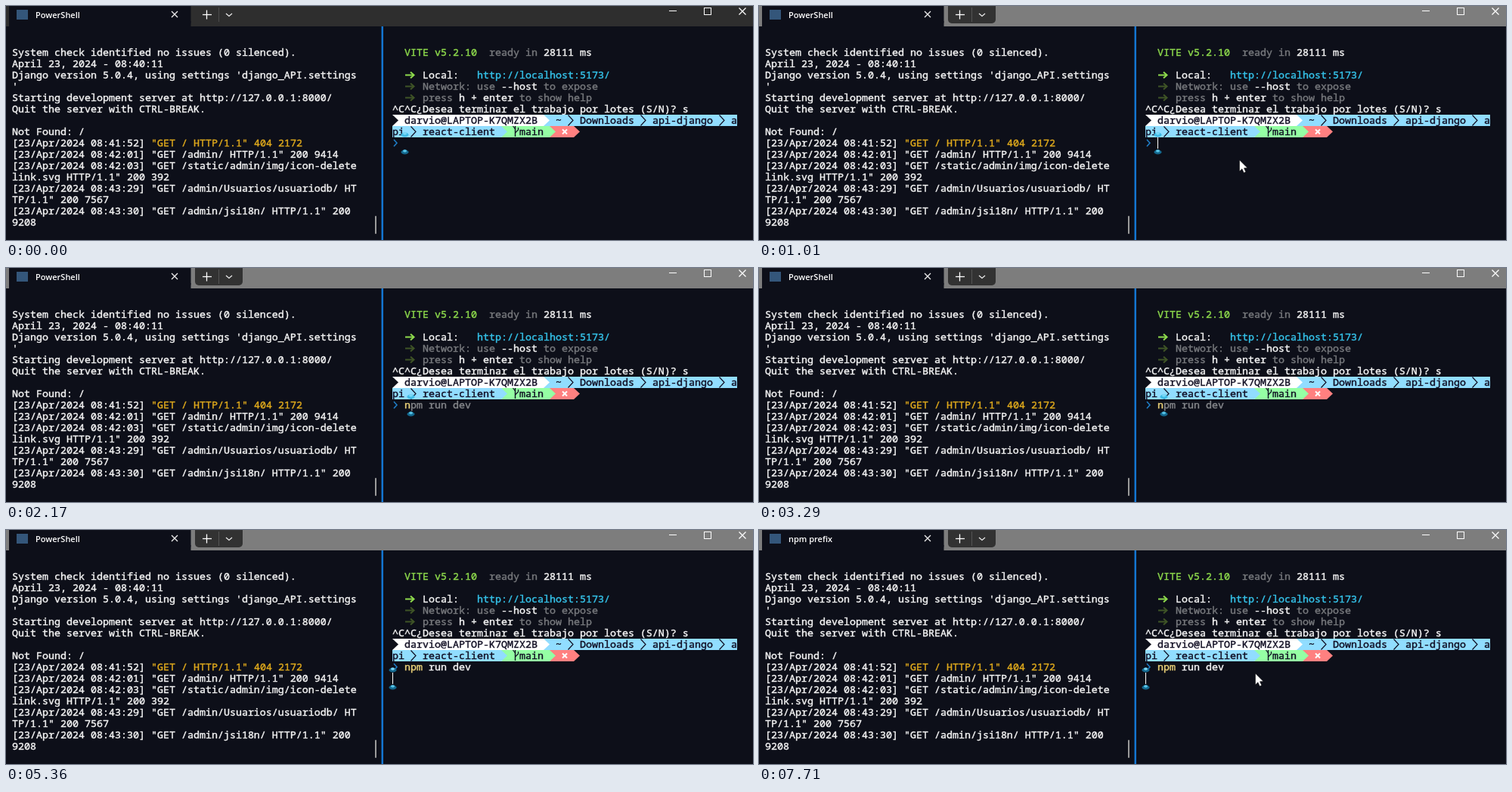
Recreate the animation shown at these times as an HTML page with a canvas. Size 988 by 310 pixels, loop 8 s.

```html
<!DOCTYPE html>
<html lang="es">
<head>
<meta charset="utf-8">
<title>Terminal</title>
<style>
html, body { margin: 0; width: 100%; height: 100%; overflow: hidden; background: #0d0f19; }
canvas { display: block; }
</style>
</head>
<body>
<canvas id="stage" width="988" height="310"></canvas>
<script>
const ctx = document.getElementById('stage').getContext('2d');
const LOOP = 8000, CELL = 8, ROW = 15, TOP = 54, LEFT = 8, RIGHT = 511;
const MONO = '13.333px "Noto Sans Mono", "DejaVu Sans Mono", monospace';
const BG = '#0d0f19', WHITE = '#f6f6f6', DIM = '#77797d', INK = '#100e23';
const BLUE = '#91ddff', GREEN = '#95ffa4', RED = '#ff8080', LIME = '#8edb4c', CYAN = '#35c3ea';
const AMBER = '#e0aa1c', YELLOW = '#eed47a', MOSS = '#3f5426';

const log = [
  'System check identified no issues (0 silenced).',
  'April 23, 2024 - 08:40:11',
  "Django version 5.0.4, using settings 'django_API.settings",
  "'",
  'Starting development server at http://127.0.0.1:8000/',
  'Quit the server with CTRL-BREAK.',
  '',
  'Not Found: /',
  '[23/Apr/2024 08:41:52]',
  '[23/Apr/2024 08:42:01] "GET /admin/ HTTP/1.1" 200 9414',
  '[23/Apr/2024 08:42:03] "GET /static/admin/img/icon-delete',
  'link.svg HTTP/1.1" 200 392',
  '[23/Apr/2024 08:43:29] "GET /admin/Usuarios/usuariodb/ HT',
  'TP/1.1" 200 7567',
  '[23/Apr/2024 08:43:30] "GET /admin/jsi18n/ HTTP/1.1" 200',
  '9208'
];

// Times at which the text bar turns on or off, starting from off.
const blinks = [740, 1490, 1640, 2170, 2760, 3290, 3860, 4370, 4770, 5910, 6480, 7110, 7640];

// Pointer stops: time, x, y; a missing place hides it.
const stops = [
  [0], [70, 632, 246], [230, 636, 204], [1640],
  [6240, 636, 204], [6330, 651, 203], [6420, 647, 203], [6510, 642, 202],
  [6710, 648, 197], [6780, 653, 193], [6840, 657, 190]
];

// A hairline outline gives the regular face its medium weight.
function text(str, x, row, color) {
  const y = TOP + row * ROW + 12;
  ctx.font = MONO;
  ctx.fillStyle = ctx.strokeStyle = color;
  ctx.lineWidth = .4;
  ctx.fillText(str, x, y);
  ctx.strokeText(str, x, y);
}

const right = (str, col, row, color = WHITE) => text(str, RIGHT + col * CELL, row, color);

function rect(x, y, w, h, color) {
  ctx.fillStyle = color;
  ctx.fillRect(x, y, w, h);
}

function round(x, y, w, h, r, color) {
  ctx.fillStyle = color;
  ctx.beginPath();
  ctx.roundRect(x, y, w, h, r);
  ctx.fill();
}

function oval(x, y, rx, ry, color) {
  ctx.fillStyle = color;
  ctx.beginPath();
  ctx.ellipse(x, y, rx, ry, 0, 0, 7);
  ctx.fill();
}

function path(points, close) {
  ctx.beginPath();
  for (let i = 0; i < points.length; i += 2) ctx.lineTo(points[i], points[i + 1]);
  if (close) ctx.closePath();
}

function line(points, color, width = 1) {
  path(points);
  ctx.strokeStyle = color;
  ctx.lineWidth = width;
  ctx.stroke();
}

function shape(points, color) {
  path(points, true);
  ctx.fillStyle = color;
  ctx.fill();
}

function cross(x, y, r, color, width = 1) {
  line([x - r, y - r, x + r, y + r], color, width);
  line([x - r, y + r, x + r, y - r], color, width);
}

function segment(from, to, row, color) {
  rect(RIGHT + from * CELL, TOP + row * ROW, (to - from) * CELL, ROW, color);
}

function tip(col, row, color) {
  const x = RIGHT + col * CELL, y = TOP + row * ROW;
  shape([x, y, x + CELL, y + ROW / 2, x, y + ROW], color);
}

function chevron(col, row) {
  const x = RIGHT + col * CELL, y = TOP + row * ROW;
  line([x + .5, y + .5, x + 7, y + 7.5, x + .5, y + 14.5], INK, 1.2);
}

function arrow(row, color) {
  const x = RIGHT + 2 * CELL, y = TOP + row * ROW + 7.5;
  line([x + 1, y, x + 12, y], color, 2);
  line([x + 8, y - 4, x + 12.5, y, x + 8, y + 4], color, 2);
}

function drawBar(t) {
  const active = t >= 1010;
  rect(0, 0, 988, 27, active ? '#7d7d7d' : '#2e2e2e');
  round(4, -6, 240.5, 33, 6, BG);
  rect(4, 20, 240.5, 7, BG);
  rect(14, 5, 15, 13, '#34567a');
  ctx.font = '600 11px "Open Sans", "Noto Sans", sans-serif';
  ctx.fillStyle = '#fff';
  const title = t < 5910 ? 'PowerShell' : t < 7640 ? 'npm run dev' : 'npm prefix';
  ctx.fillText(title, 39, 16);
  cross(223, 11, 4, '#eee', 1.3);
  if (active) round(250, -5, 63, 28, 5, '#323232');
  line([260, 11.5, 272, 11.5], '#fff', 1.3);
  line([265.5, 5.5, 265.5, 17.5], '#fff', 1.3);
  line([281.5, 2, 281.5, 21], active ? '#555' : '#4c4c4c');
  line([291, 10, 295, 13.5, 299, 10], '#eee', 1.2);
  line([877, 6.5, 887, 6.5], '#fff');
  ctx.strokeStyle = '#fff';
  ctx.lineWidth = 1;
  ctx.strokeRect(923.5, 2.5, 9, 9);
  cross(974, 7, 4.5, '#fff', 1.2);
}

function drawLeft() {
  log.forEach((str, row) => text(str, LEFT, row, WHITE));
  text('"GET / HTTP/1.1" 404 2172', LEFT + 23 * CELL, 8, AMBER);
  round(488, 278, 2, 24, 1, '#9b9b9b');
  rect(496.5, 27, 2.5, 283, '#1375d0');
}

function drawVite() {
  right('VITE v5.2.10', 2, 0, LIME);
  right('ready in', 16, 0, DIM);
  right('28111 ms', 25, 0);
  arrow(2, LIME);
  right('Local:', 5, 2);
  right('http://localhost:5173/', 14, 2, CYAN);
  arrow(3, MOSS);
  right('Network: use', 5, 3, DIM);
  right('--host', 18, 3);
  right('to expose', 25, 3, DIM);
  arrow(4, MOSS);
  right('press', 5, 4, DIM);
  right('h + enter', 11, 4);
  right('to show help', 21, 4, DIM);
  right('^C^C¿Desea terminar el trabajo por lotes (S/N)? s', 0, 5);
}

function drawPrompt() {
  segment(0, 25, 6, '#fff');
  tip(0, 6, BG);
  segment(25, 57, 6, BLUE);
  tip(25, 6, '#fff');
  right('darvio@LAPTOP-K7QMZX2B', 2, 6, INK);
  right('~', 27, 6, INK);
  right('Downloads', 31, 6, INK);
  right('api-django', 43, 6, INK);
  right('a', 56, 6, INK);
  [29, 41, 54].forEach(col => chevron(col, 6));

  segment(0, 18, 7, BLUE);
  segment(18, 26, 7, GREEN);
  segment(26, 30, 7, RED);
  tip(18, 7, BLUE);
  tip(26, 7, GREEN);
  tip(30, 7, RED);
  right('pi', 0, 7, INK);
  chevron(3, 7);
  right('react-client', 5, 7, INK);
  right('main', 21, 7, INK);
  line([673.5, 159, 673.5, 173], INK, 1.4);
  line([677.5, 161, 677.5, 164, 673.5, 168], INK, 1.2);
  line([670.5, 159, 673.5, 163], INK, 1.2);
  cross(739, 166.5, 3, '#fff', 2);
}

function drawInput(t) {
  line([513, 177, 517, 181.5, 513, 186], '#1f7cc4', 1.6);
  if (t >= 4770) {
    right('npm', 2, 8, YELLOW);
    right('run dev', 6, 8);
  } else if (t >= 1640) {
    right('n', 2, 8, YELLOW);
    if (t >= 1790) right('pm run dev', 3, 8, '#85878b');
  }
}

function blob(x, y, rim, glow) {
  oval(x, y + .5, 5, 3, rim);
  oval(x, y - 1, 2.5, 1.8, glow);
}

function drawCaret(t) {
  const col = t < 1640 ? 2 : t < 4770 ? 3 : t < 5360 ? 13 : 0;
  const x = RIGHT + col * CELL, y = TOP + (t < 5360 ? 8 : 9) * ROW;
  blob(x + .5, y - 4, t < 5360 ? '#3fbce6' : '#14698f', '#7ad8f6');
  blob(x + .5, y + 19, '#14698f', '#58c6ea');
  if (blinks.filter(b => b <= t).length % 2) rect(x, y, 1, ROW, '#fff');
}

function drawPointer(t) {
  const [, x, y] = stops.filter(s => s[0] <= t).pop();
  if (x === undefined) return;
  ctx.save();
  ctx.translate(x - .5, y);
  shape([0, 0, 0, 15, 3.4, 11.8, 5.8, 17, 8.3, 15.8, 6, 10.8, 10.5, 10.6], '#fff');
  ctx.strokeStyle = '#000';
  ctx.lineWidth = .5;
  ctx.stroke();
  ctx.restore();
}

function draw(t) {
  rect(0, 0, 988, 310, BG);
  drawBar(t);
  drawLeft();
  drawVite();
  drawPrompt();
  drawInput(t);
  drawCaret(t);
  drawPointer(t);
}

const start = performance.now();
function tick() {
  draw((performance.now() - start) % LOOP);
  requestAnimationFrame(tick);
}
tick();
</script>
</body>
</html>
```
